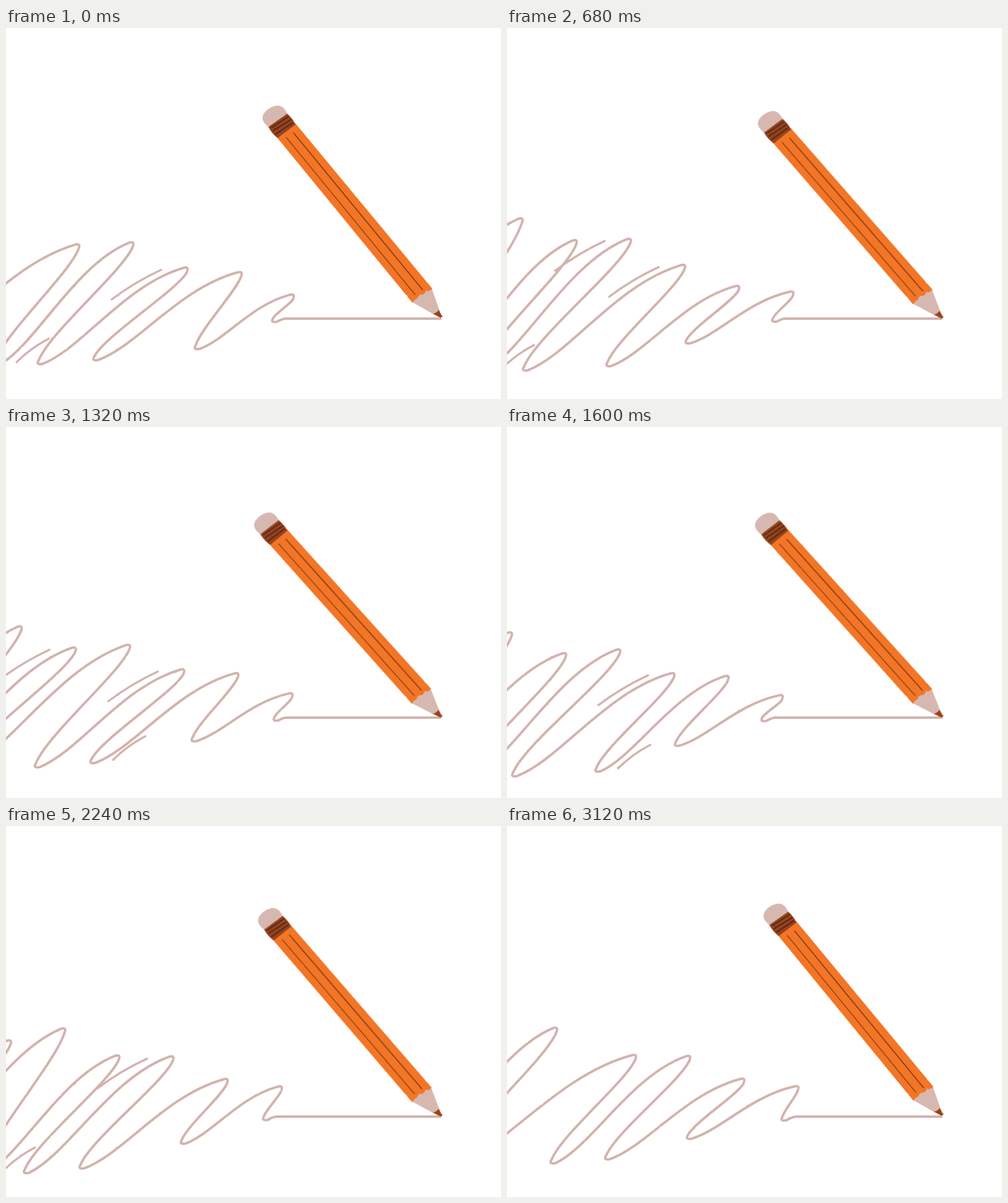
Animation, 800 px wide and 600 px high, one loop 3160 ms. Source, as an HTML page:

```html
<!DOCTYPE html>
<html lang="en">
<head>
<meta charset="utf-8">
<title>Scribbling pencil</title>
<style>
  html, body { margin: 0; width: 100%; height: 100%; overflow: hidden; background: #fff; }
  svg { display: block; width: 800px; height: 600px; }
  .ink { fill: none; stroke: #d3b3ad; stroke-width: 4; stroke-linecap: round; stroke-linejoin: round; }
  #dashes { stroke-width: 3.4; }
  .groove { fill: none; stroke: #8a3d16; stroke-linecap: round; }
  .band { fill: none; stroke: #5b2a1c; stroke-width: 2.4; stroke-linecap: round; }
</style>
</head>
<body>
<svg viewBox="0 0 800 600" xmlns="http://www.w3.org/2000/svg">
  <defs>
    <filter id="rough" filterUnits="userSpaceOnUse" x="0" y="0" width="800" height="600" color-interpolation-filters="sRGB">
      <feTurbulence type="fractalNoise" baseFrequency="0.13" numOctaves="2" seed="4" result="noise"/>
      <feDisplacementMap in="SourceGraphic" in2="noise" scale="1.6" xChannelSelector="R" yChannelSelector="G"/>
    </filter>
  </defs>
  <g filter="url(#rough)">
    <path id="scribble" class="ink"/>
    <path id="dashes" class="ink"/>
  </g>
  <g id="pencil">
    <g filter="url(#rough)">
      <path fill="#d6b8b1" d="M425 161 Q414 152 414.5 145 C415 135 430 125 440 125.500 C448 126.500 451 132 455 139 Z"/>
      <path fill="#d6b8b1" d="M656 443 L692 463.500 L701 458 L688 421 L672 424 Z"/>
      <path fill="#f37526" d="M438 177 L467.500 154 L689 421.500 Q684 427 679 425 Q676 432 671 431 Q666 432 665 437 Q660 439 657 444.500 Z"/>
      <path fill="#97431b" d="M424 160 L454.500 138.500 Q463 146 468 156 L439 178 Q429 170 424 160 Z"/>
      <path class="band" d="M429 161 L456 143.500 M432 166 L460 148.500 M436 171.500 L463 153.500"/>
      <path class="groove" stroke-width="1.8" d="M465 170 L673 423"/>
      <path class="groove" stroke-width="1.300" d="M453 177 L661 431"/>
      <path fill="#9a4216" d="M690 462 Q696 461 699.500 456 Q703 462 704.500 467 Q704 469 700 467.500 Z"/>
    </g>
  </g>
</svg>
<script>
const STEP = 40, LOOP = 3160, FRAMES = LOOP / STEP;
const TIP = [703, 468], LINE_Y = 470;
const OLDEST = 7, SPACING = 90;
const el = id => document.getElementById(id);

function seeded(seed) {
  let s = seed * 7919 + 17;
  const next = (lo = 0, hi = 1) => {
    s = (s * 16807) % 2147483647;
    return lo + (hi - lo) * s / 2147483647;
  };
  for (let i = 0; i < 5; i++) next();
  return next;
}

// One stroke is born per step; with age it runs left, leans and grows
function stroke(born, age) {
  const rnd = seeded((born + FRAMES) % FRAMES + 1);
  const x = 458 - SPACING * age + rnd(-20, 20);
  const rise = Math.min(140, 42 + 22 * age) * rnd(0.8, 1.2);
  const depth = Math.min(82, 5 + 36 * age) * rnd(0.85, 1.2);
  const lean = Math.min(160, 30 + 56 * age) * rnd(0.85, 1.15);
  return { age, high: [x, LINE_Y - rise], low: [x - lean, LINE_Y + depth] };
}

const nums = list => list.map(n => n.toFixed(1)).join(" ");
const quad = (...p) => "Q" + nums(p);

// Control points a, b and c, d are fractions of the way between both ends
function cubic([x0, y0], [x1, y1], a, b, c, d) {
  const w = x1 - x0, h = y1 - y0;
  return "C" + nums([x0 + a * w, y0 + b * h, x0 + c * w, y0 + d * h, x1, y1]);
}

function scribblePath(strokes) {
  let pen = strokes[0].low;
  let d = "M" + nums(pen);
  for (const { high: [hx, hy], low: [lx, ly] } of strokes.slice(1)) {
    d += cubic(pen, [hx - 6, hy + 1], 0.28, 0.16, 0.58, 0.82) + quad(hx + 4, hy - 2, hx - 1, hy + 9);
    d += cubic([hx - 1, hy + 9], [lx + 1, ly - 6], 0.12, 0.22, 0.88, 0.75) + quad(lx - 4, ly + 2, lx + 7, ly);
    pen = [lx + 7, ly];
  }
  const joinX = pen[0] + Math.max(10, (pen[1] - LINE_Y) * 3);
  return d + cubic(pen, [joinX, LINE_Y], 0.3, 0.5, 0.55, 1) + `L702 ${LINE_Y}`;
}

const dash = (x0, y0, x1, y1) =>
  "M" + nums([x0, y0]) + quad((x0 + x1) / 2 - 3, (y0 + y1) / 2 - 4, x1, y1);

// Short marks beside some turns of the larger strokes
function dashPath(strokes, frame) {
  const rnd = seeded(frame + 200);
  let d = "";
  for (const { age, high: [hx, hy], low: [lx, ly] } of strokes) {
    if (age < 2) continue;
    if (rnd() < 0.3) d += dash(hx - 122, hy + 52, hx - 42, hy + 4);
    if (rnd() < 0.3) d += dash(lx + 36, ly - 5, lx + 88, ly - 43);
  }
  return d;
}

// Leans back with an ease-out, rests, then returns with an ease-in-out
function tiltAt(t) {
  const out = Math.sin(Math.PI / 2 * Math.min(1, t / 1520));
  const back = Math.min(1, Math.max(0, (t - 1700) / 1100));
  return 2.5 * out * (1 + Math.cos(Math.PI * back)) / 2;
}

let shown = -1;
function draw(time) {
  const frame = Math.floor((time % LOOP) / STEP);
  if (frame === shown) return;
  shown = frame;
  const strokes = [];
  for (let age = OLDEST; age >= 0; age--) strokes.push(stroke(frame - age, age));
  el("scribble").setAttribute("d", scribblePath(strokes));
  el("dashes").setAttribute("d", dashPath(strokes, frame));

  const tilt = tiltAt(frame * STEP);
  const drop = 1.2 * Math.min(1, 4 * tilt);
  el("pencil").setAttribute("transform", `translate(0 ${drop}) rotate(${-tilt} ${TIP})`);
}

const start = performance.now();
function tick() {
  draw(performance.now() - start);
  requestAnimationFrame(tick);
}
tick();
</script>
</body>
</html>
```
